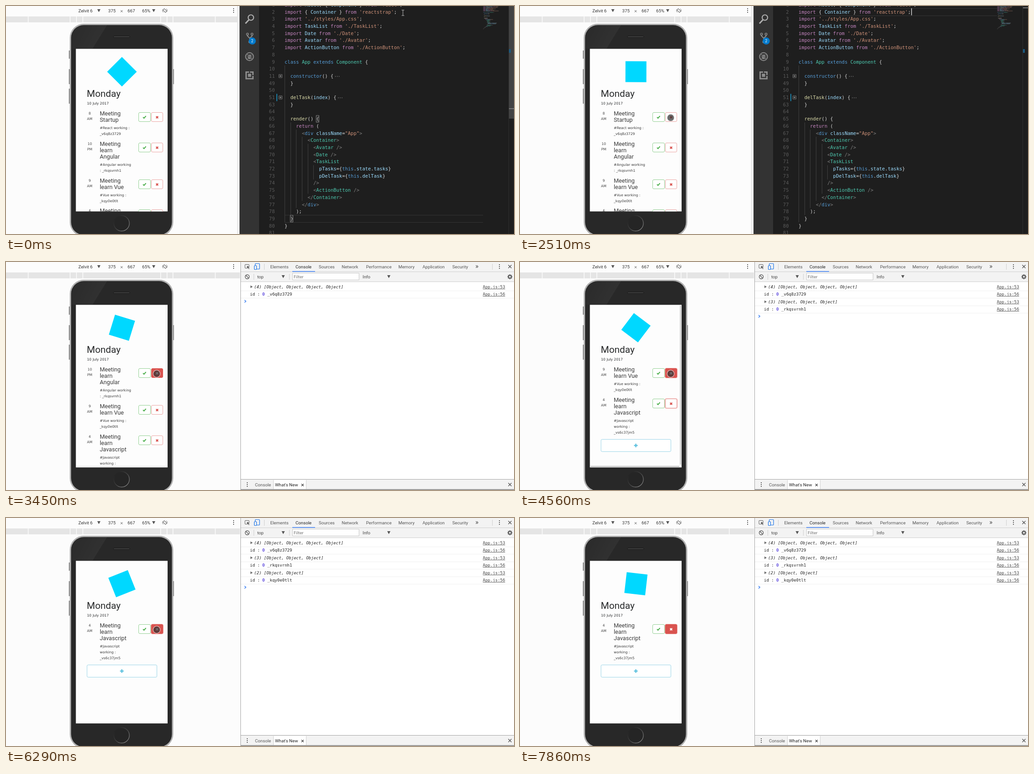
An HTML page with a canvas for the animation above (7960 ms loop, 1116x502 px).

```html
<!DOCTYPE html>
<html lang="en">
<head>
<meta charset="utf-8">
<title>Task list demo</title>
<style>
  html, body { margin: 0; width: 100%; height: 100%; overflow: hidden; background: #fcfcfc; }
  canvas { display: block; }
</style>
</head>
<body>
<canvas id="stage" width="1116" height="502"></canvas>
<script>
const ctx = document.getElementById('stage').getContext('2d');
const LOOP = 7960, FOCUS_LINE = 270, SHOW_CONSOLE = 2640, CLICKS = [2820, 4080, 5900];
const MONO = '"DejaVu Sans Mono", monospace';
const UI = '9.7px Roboto, sans-serif';
const SMALL = '7.65px "DejaVu Sans", sans-serif';
const TITLE = '12.7px Roboto, sans-serif';

// Mouse path: time, x, y
const PATH = [[400, 872, 15], [1080, 409, 226], [1400, 331, 246], [6800, 331, 246], [7560, 947, 478]];
const MOUSE_GONE = 7660;

const COLORS = { p: '#c586c0', v: '#9cdcfe', s: '#ce9178', w: '#d4d4d4', k: '#569cd6',
                 c: '#4ec9b0', f: '#dcdcaa', g: '#808080' };
const importLine = name => `pimport |v${name} |pfrom |s'./${name}'|w;`;
// Line number, indent, tokens whose first letter names the colour
const CODE = [
  [1, 0, "pimport |vReact|w, { |vComponent |w} |pfrom |s'react'|w;"],
  [2, 0, "pimport |w{ |vContainer |w} |pfrom |s'reactstrap'|w;"],
  [3, 0, "pimport |s'../styles/App.css'|w;"],
  [4, 0, importLine('TaskList')],
  [5, 0, importLine('Date')],
  [6, 0, importLine('Avatar')],
  [7, 0, importLine('ActionButton')],
  [8, 0, ''],
  [9, 0, 'kclass |cApp |kextends |cComponent |w{'],
  [10, 0, ''],
  [11, 1, 'kconstructor|w() {'],
  [49, 1, 'w}'],
  [50, 0, ''],
  [51, 1, 'fdelTask|w(|vindex|w) {'],
  [63, 1, 'w}'],
  [64, 0, ''],
  [65, 1, 'frender|w() {'],
  [66, 2, 'preturn |w('],
  [67, 3, 'g<|kdiv |vclassName|w=|s"App"|g>'],
  [68, 4, 'g<|cContainer|g>'],
  [69, 5, 'g<|cAvatar |g/>'],
  [70, 5, 'g<|cDate |g/>'],
  [71, 5, 'g<|cTaskList'],
  [72, 6, 'vpTasks|w={|kthis|w.|vstate|w.|vtasks|w}'],
  [73, 6, 'vpDelTask|w={|kthis|w.|vdelTask|w}'],
  [74, 5, 'g/>'],
  [75, 5, 'g<|cActionButton |g/>'],
  [76, 4, 'g</|cContainer|g>'],
  [77, 3, 'g</|kdiv|g>'],
  [78, 2, 'w);'],
  [79, 1, 'w}'],
  [80, 0, 'w}'],
  [81, 0, '']
];
const GUIDES = [[8, 29], [16, 28], [17, 27], [18, 26], [19, 25], [22, 23]];

const TASKS = [
  { time: ['8', 'AM'], title: ['Meeting', 'Startup'], note: ['#React working :', '_v6q8z3729'] },
  { time: ['10', 'PM'], title: ['Meeting', 'learn', 'Angular'], note: ['#Angular working', ': _rkqsvrnh1'] },
  { time: ['9', 'AM'], title: ['Meeting', 'learn Vue'], note: ['#Vue working :', '_kqy0e0tlt'] },
  { time: ['4', 'AM'], title: ['Meeting', 'learn', 'Javascript'], note: ['#Javascript', 'working :', '_vs6c37jm5'] }
];
const IDS = ['_v6q8z3729', '_rkqsvrnh1', '_kqy0e0tlt'];

function text(str, x, y, font, color, align = 'left') {
  ctx.font = font;
  ctx.fillStyle = color;
  ctx.textAlign = align;
  ctx.fillText(str, x, y);
}
function rect(x, y, w, h, color) {
  ctx.fillStyle = color;
  ctx.fillRect(x, y, w, h);
}
function box(x, y, w, h, r, fill, stroke, width = 1) {
  ctx.beginPath();
  ctx.roundRect(x, y, w, h, r);
  paint(fill, stroke, width);
}
function circle(x, y, r, fill, stroke, width = 1) {
  ctx.beginPath();
  ctx.arc(x, y, r, 0, Math.PI * 2);
  paint(fill, stroke, width);
}
function paint(fill, stroke, width) {
  if (fill) { ctx.fillStyle = fill; ctx.fill(); }
  if (stroke) { ctx.strokeStyle = stroke; ctx.lineWidth = width; ctx.stroke(); }
}
function line(points, color, width = 1) {
  ctx.beginPath();
  for (let i = 0; i < points.length; i += 2) ctx.lineTo(points[i], points[i + 1]);
  paint(null, color, width);
}
function polygon(points, fill, stroke, width) {
  ctx.beginPath();
  for (let i = 0; i < points.length; i += 2) ctx.lineTo(points[i], points[i + 1]);
  ctx.closePath();
  paint(fill, stroke, width);
}
function cross(x, y, r, color, width) {
  line([x - r, y - r, x + r, y + r], color, width);
  line([x + r, y - r, x - r, y + r], color, width);
}
function dots(x, y) {
  for (const d of [-4, 0, 4]) rect(x - 1, y + d - 1, 2, 2, '#5a5a5a');
}
function downArrow(x, y) {
  polygon([x - 3.5, y - 3, x + 3.5, y - 3, x, y + 3.5], '#555');
}

function drawDeviceBar(width) {
  text('Zelvit 6', 159, 13.5, UI, '#333');
  downArrow(204, 10);
  text('375', 224.5, 13.5, UI, '#333');
  cross(254, 11.5, 2.2, '#555');
  text('667', 267, 13.5, UI, '#333');
  text('65%', 299, 13.5, UI, '#333');
  downArrow(324.5, 10);
  ctx.save();
  ctx.translate(349, 10);
  ctx.rotate(-Math.PI / 4);
  box(-2.2, -4, 4.4, 8, 1, null, '#555');
  ctx.restore();
  for (const a of [-.9, 2.25]) {
    ctx.beginPath();
    ctx.arc(349, 10, 5.2, a, a + 1.4);
    paint(null, '#777', 1);
  }
  dots(500, 10);
  rect(0, 23, width, 13, '#e5e5e5');
  for (const x of [48, 140, 154, 168, 339, 353, 366, 459]) rect(x, 23, 1.5, 13, '#fcfcfc');
}

function drawPhone() {
  for (const [y, h] of [[98, 18], [139, 33], [182, 33]]) rect(138, y, 3, h, '#8c8c8c');
  rect(366, 139, 3, 33, '#8c8c8c');
  box(140, 39, 227.5, 468, 31, '#b0b0b0');
  box(143, 42, 221.5, 462, 28, '#282828');
  const shine = ctx.createLinearGradient(145, 45, 205, 75);
  shine.addColorStop(0, 'rgba(255,255,255,.01)');
  shine.addColorStop(1, 'rgba(255,255,255,.045)');
  polygon([168, 42, 222, 42, 190, 94, 144, 94, 144, 68, 152, 50], shine);
  box(236, 66, 36, 3.5, 2, '#3c3c3c', '#171717');
  const ring = ctx.createLinearGradient(240, 465, 268, 491);
  ring.addColorStop(0, '#202020');
  ring.addColorStop(.5, '#444');
  ring.addColorStop(1, '#858585');
  circle(254, 478.5, 17, '#252525', ring, 1.3);
  rect(153.5, 94.3, 201.5, 358, '#fdfdfd');
}

function drawButtons(y, pressed, glow) {
  box(291.5, y - 1.5, 26, 20, 2.5, '#fff', '#92cf92');
  line([301, y + 8.8, 303.2, y + 11, 307.5, y + 6.2], '#4cae4c', 2);
  if (glow) box(318, y - 2.7, 28, 22.5, 4, '#efaaa8');
  box(319.5, y - 1.5, 25, 20, 2.5, pressed ? '#d9534f' : '#fff', pressed ? '#d9534f' : '#eba5a3');
  cross(332, y + 9, 2.3, pressed ? '#fff' : '#d9534f', 2);
}

function drawApp(t, removed) {
  ctx.save();
  ctx.beginPath();
  ctx.rect(153.5, 94.3, 201.5, 358);
  ctx.clip();

  ctx.save();
  ctx.translate(254.7, 144.7);
  ctx.rotate((45 + t * .018) * Math.PI / 180);
  rect(-23, -23, 46, 46, '#00d8ff');
  ctx.restore();

  text('Monday', 177.5, 199.7, '20.8px Roboto, sans-serif', '#292b2c');
  text('10 July 2017', 178, 217, SMALL, '#292b2c');

  let y = 236;
  TASKS.slice(removed).forEach((task, i) => {
    const top = Math.round(y);
    task.time.forEach((s, n) => text(s, 184, top + 2.7 + n * 12.5, SMALL, '#444', 'center'));
    task.title.forEach((s, n) => text(s, 206, top + 5 + n * 14, TITLE, '#3a3a3a'));
    const noteY = top + 4 + task.title.length * 14;
    task.note.forEach((s, n) => text(s, 206, noteY + 2.7 + n * 13.2, SMALL, '#3a3a3a'));
    drawButtons(top, i === 0 && removed > 0, removed > 1);
    y += 12.4 + task.title.length * 14 + task.note.length * 13.2;
  });

  const addY = Math.round(y);
  box(178, addY - 6.5, 153.5, 27, 2.5, '#fff', '#9bd5e8');
  line([250.5, addY + 7, 258.5, addY + 7], '#5bc0de', 2.4);
  line([254.5, addY + 3, 254.5, addY + 11], '#5bc0de', 2.4);

  if (removed === 1 || removed === 2) {
    const age = t - CLICKS[removed - 1];
    ctx.globalAlpha = Math.max(0, Math.min(1, (700 - age) / 300));
    rect(351.5, 96, 2, removed === 1 ? 298 : 350, '#aaa');
    rect(155, 449, 195, 2, '#aaa');
  }
  ctx.restore();
}

const rowY = row => 13 + row * 15.7;

function drawActivityBar() {
  const gray = '#8c8c8c';
  rect(513, 0, 43, 502, '#333');
  circle(538, 25.5, 6, null, '#b0b0b0', 2.2);
  line([533.5, 30.5, 526, 38.5], '#b0b0b0', 3);

  line([530.5, 63, 530.5, 66, 535.5, 71, 535.5, 78], gray, 2);
  line([540.5, 63, 540.5, 66, 535.5, 71], gray, 2);
  for (const [x, y] of [[530.5, 62], [540.5, 62], [535.5, 79]]) circle(x, y, 2.2, '#333', gray, 1.6);
  circle(541, 77, 7.8, '#007acc');
  text('2', 541, 80.2, '8.5px Roboto, sans-serif', '#fff', 'center');

  circle(535, 111.5, 8.7, null, gray, 2);
  ctx.beginPath();
  ctx.ellipse(535, 112, 3.2, 4.4, 0, 0, Math.PI * 2);
  paint(gray);
  for (const y of [108, 112, 116]) line([529.5, y, 540.5, y], gray, 1.2);
  line([529, 105.5, 541, 117.5], '#333', 2.4);
  line([529, 105.5, 541, 117.5], gray, 1.3);

  rect(526, 144, 18, 17.5, gray);
  rect(529, 147, 12, 11.5, '#333');
  rect(531.5, 149, 7, 7, gray);
  rect(534, 144, 2, 4, '#333');
  rect(541, 152, 3, 2, '#333');
}

function drawEditor(t) {
  const edited = t >= FOCUS_LINE;
  const current = edited ? 0 : 29;
  drawActivityBar();
  rect(556, 0, 560, 502, '#1e1e1e');

  for (const edge of [-8, 7.5]) rect(612, Math.round(rowY(current) + edge), 436, 1, '#343434');
  GUIDES.forEach(([from, to], i) =>
    rect(Math.round(612 + i * 12.64), rowY(from) - 7.85, 1, (to - from + 1) * 15.7, '#404040'));
  rect(594, rowY(12) - 8, 2, 16, '#1b81a8');

  CODE.forEach(([number, indent, source], i) => {
    const y = rowY(i - 1) + 3.6;
    text(number, 590.5, y, '10.5px ' + MONO, '#5a5a5a', 'right');
    let col = indent * 2;
    for (const token of source ? source.split('|') : []) {
      const word = token.slice(1), color = COLORS[token[0]];
      text(word, 612 + col * 6.32, y, '10.5px ' + MONO, color);
      ctx.globalAlpha = .45;
      rect(1048.5 + col * .8, 1 + i * 1.57, word.trim().length * .8, 1, color);
      ctx.globalAlpha = 1;
      col += word.length;
    }
  });

  for (const [row, x] of [[9, 723], [12, 729.5]]) {
    const y = rowY(row);
    box(599.5, y - 3.5, 7, 7, 0, null, '#777');
    line([601, y, 605, y], '#aaa');
    line([603, y - 2, 603, y + 2], '#aaa');
    for (const d of [0, 4, 8]) rect(x + d, y, 1.4, 1.4, '#888');
  }

  if (!edited) {
    box(681.5, rowY(15) - 7.5, 6, 15, 0, null, '#888');
    box(624.5, rowY(29) - 7.5, 6, 15, 0, null, '#888');
  } else if ((t + 940) % 1000 < 500) {
    rect(859.5, 5, 1.5, 15.5, '#d4d4d4');
  }

  rect(1104, 0, 1, 502, '#303030');
  ctx.globalAlpha = Math.max(0, Math.min(1, (1700 - t) / 400));
  rect(1105, 0, 11, 248, '#434343');
  ctx.globalAlpha = 1;
  rect(1105, edited ? 3 : 225, 11, 2, '#777');
  rect(1105, 95, 4, 8, '#1b5a80');
}

function drawConsole(removed) {
  const border = '#cfcfcf', gray = '#5a5a5a';
  rect(515, 0, 601, 502, '#fff');
  rect(516, 0, 600, 43, '#f3f3f3');
  for (const y of [21, 43]) rect(516, y, 600, 1, border);
  rect(515, 0, 1, 502, '#a3a3a3');

  box(525, 5.5, 9, 8, 1, null, gray);
  polygon([529, 8, 536, 11, 533, 12, 535, 15, 533.5, 16, 531.5, 13, 529.5, 15], gray, '#f3f3f3', .6);
  box(547.5, 3.5, 9.5, 12, 1, null, '#1a73e8', 1.2);
  box(545.5, 8, 5, 8.5, 1, '#f3f3f3', '#1a73e8', 1.2);
  for (const x of [567, 1068]) rect(x, 4, 1, 13, border);
  const tabs = { Elements: 580.5, Console: 636, Sources: 687, Network: 737.5, Performance: 791,
                 Memory: 862, Application: 915, Security: 980.5 };
  for (const name in tabs) text(name, tabs[name], 13.7, UI, name === 'Console' ? '#222' : '#555');
  rect(629, 20, 50, 1.5, '#3e82f7');
  text('»', 1031, 13.7, '15px Roboto, sans-serif', '#444');
  dots(1084, 10);
  cross(1107, 10, 3.5, gray, 1.5);

  circle(530, 32.5, 4.5, null, gray, 1.4);
  line([527, 29.5, 533, 35.5], gray, 1.4);
  for (const x of [544, 622]) rect(x, 26, 1, 13, border);
  text('top', 552, 36, UI, '#444');
  downArrow(609, 32);
  box(629.5, 24.5, 146, 15, 0, '#fff', '#c8c8c8');
  text('Filter', 632, 36, UI, '#777');
  text('Info', 783.5, 36, UI, '#444');
  downArrow(841, 32);
  for (let i = 0; i < 4; i++) {
    const a = i * Math.PI / 4, dx = Math.cos(a) * 5.5, dy = Math.sin(a) * 5.5;
    line([1107 - dx, 32.5 - dy, 1107 + dx, 32.5 + dy], gray, 2);
  }
  circle(1107, 32.5, 3, '#f3f3f3', gray, 2);

  const font = '9.05px ' + MONO;
  for (let row = 0; row < removed * 2; row++) {
    const y = 54.5 + row * 16.5, n = row >> 1, isList = row % 2 === 0;
    if (isList) {
      polygon([537, y - 3, 537, y + 3, 542, y], '#6e6e6e');
      const items = Array(4 - n).fill('Object').join(', ');
      text(`(${4 - n}) [${items}]`, 545, y + 3.2, 'italic ' + font, '#222');
    } else {
      text('id :', 536, y + 3.2, font, '#222');
      text('0', 563, y + 3.2, font, '#1c00cf');
      text(IDS[n], 574, y + 3.2, font, '#222');
    }
    text(isList ? 'App.js:53' : 'App.js:56', 1096.5, y + 3.2, font, '#444', 'right');
    rect(1047.5, Math.round(y + 4), 49, 1, '#666');
    rect(516, Math.round(y + 8), 600, 1, '#f0f0f0');
  }
  const promptY = 54.5 + removed * 33 - (removed ? 1 : 0);
  line([524, promptY - 2.7, 527, promptY, 524, promptY + 2.7], '#367cf1', 1.5);

  rect(516, 478, 600, 24, '#f3f3f3');
  rect(516, 478, 600, 1, '#a3a3a3');
  dots(530, 490);
  text('Console', 547, 494.2, UI, '#555');
  rect(587, 480, 73, 20, '#fff');
  for (const x of [587, 659]) rect(x, 480, 1, 20, border);
  text("What's New", 591, 494.2, UI, '#222');
  cross(651.5, 491, 2.5, '#444', 1.3);
  cross(1107, 490, 3.5, gray, 1.5);
  rect(516, 500, 600, 2, '#9a9a9a');
}

function mouseAt(t) {
  if (t <= PATH[0][0]) return PATH[0].slice(1);
  for (let i = 1; i < PATH.length; i++) {
    const [t0, x0, y0] = PATH[i - 1], [t1, x1, y1] = PATH[i];
    if (t <= t1) {
      const p = (t - t0) / (t1 - t0), e = p * p * (3 - 2 * p);
      return [x0 + (x1 - x0) * e, y0 + (y1 - y0) * e];
    }
  }
  return PATH[PATH.length - 1].slice(1);
}

function drawMouse(t) {
  if (t > MOUSE_GONE) return;
  const [x, y] = mouseAt(t);
  if (x < 355) {
    circle(x, y, 7.8, 'rgba(45,45,45,.7)', 'rgba(255,255,255,.6)', 1.3);
  } else if (x > 556 && t < SHOW_CONSOLE) {
    line([x, y - 6, x, y + 6], '#bbb');
    for (const d of [-6, 6]) line([x - 3, y + d, x + 3, y + d], '#bbb');
  } else {
    polygon([x, y, x, y + 13, x + 3, y + 10.3, x + 5.2, y + 15, x + 7.3, y + 14,
             x + 5.2, y + 9.5, x + 9, y + 9.3], '#fff', '#222', 1);
  }
}

function draw(now) {
  const t = now % LOOP;
  const removed = CLICKS.filter(c => t >= c).length;
  const consoleOpen = t >= SHOW_CONSOLE;
  rect(0, 0, 1116, 502, '#fcfcfc');
  drawDeviceBar(consoleOpen ? 514 : 508);
  drawPhone();
  drawApp(t, removed);
  if (consoleOpen) {
    drawConsole(removed);
  } else {
    rect(508, 0, 1, 502, '#dedede');
    rect(509, 0, 4, 502, '#f3f3f3');
    drawEditor(t);
  }
  drawMouse(t);
}

const start = performance.now();
function tick() {
  draw(performance.now() - start);
  requestAnimationFrame(tick);
}
tick();
</script>
</body>
</html>
```
